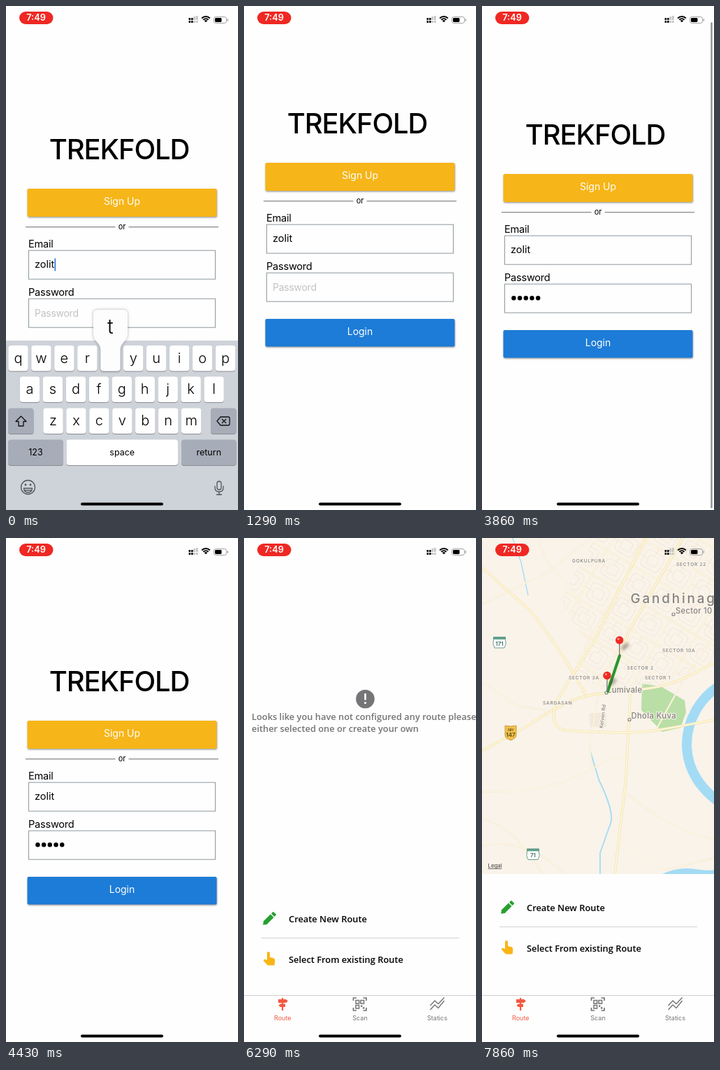
These frames come from a looping animation (332x720 px, 8000 ms). An HTML page with a canvas:

```html
<!DOCTYPE html>
<html lang="en">
<head>
<meta charset="utf-8">
<title>Sign in and route</title>
<style>
html, body { margin: 0; width: 100%; height: 100%; overflow: hidden; background: #fff; }
canvas { display: block; width: 332px; height: 720px; }
</style>
</head>
<body>
<canvas id="stage"></canvas>
<script>
const W = 332, H = 720, LOOP = 8000;
const cv = document.getElementById('stage');
const dpr = window.devicePixelRatio || 1;
cv.width = W * dpr;
cv.height = H * dpr;
const c = cv.getContext('2d');
const UI = 'Inter, "Liberation Sans", sans-serif';
const OPEN = '"Open Sans", "Noto Sans", sans-serif';

function text(s, x, y, size, o = {}) {
  c.font = `${o.w || 400} ${size}px ${o.f || UI}`;
  c.fillStyle = o.col || '#000';
  c.textAlign = o.al || 'left';
  c.letterSpacing = (o.ls || 0) + 'px';
  c.textBaseline = 'alphabetic';
  c.fillText(s, x, y);
  c.letterSpacing = '0px';
}
const mid = (s, x, y, size, o = {}) => text(s, x, y, size, { al: 'center', ...o });

function box(x, y, w, h, col, r = 0) {
  c.fillStyle = col;
  c.beginPath();
  c.roundRect(x, y, w, h, r);
  c.fill();
}
function disc(x, y, r, col) {
  c.fillStyle = col;
  c.beginPath();
  c.arc(x, y, r, 0, 7);
  c.fill();
}
function stroke(d, col, w) {
  c.strokeStyle = col;
  c.lineWidth = w;
  c.stroke(new Path2D(d));
}
function fill(d, col) {
  c.fillStyle = col;
  c.fill(new Path2D(d));
}
function at(x, y, turn, draw) {
  c.save();
  c.translate(x, y);
  c.rotate(turn);
  draw();
  c.restore();
}
function ease(k, a, b) {
  const u = Math.min(1, Math.max(0, (k - a) / (b - a)));
  return u * u * (3 - 2 * u);
}

function statusBar() {
  box(19, 8, 48.5, 18, '#ef2823', 9);
  mid('7:49', 43, 21.4, 12.8, { w: 600, col: '#fff' });
  for (let i = 0; i < 4; i++) {
    const col = i < 2 ? '#111' : '#c4c4c6';
    const tall = i < 2 ? 3 : 3 + i;
    box(261.5 + i * 3.5, 21, 2.7, 3, col, .5);
    box(261.5 + i * 3.5, 20 - tall, 2.7, tall, col, .5);
  }
  for (const [r, w] of [[8.2, 2.1], [5, 2.1], [1.6, 3]]) {
    c.strokeStyle = '#000';
    c.lineWidth = w;
    c.beginPath();
    c.arc(286, 23.2, r, -2.36, -.78);
    c.stroke();
  }
  c.strokeStyle = '#a0a0a2';
  c.lineWidth = 1;
  c.beginPath();
  c.roundRect(297.5, 15.5, 18, 9, 2.8);
  c.stroke();
  box(299, 17, 9.5, 6, '#000', 1.4);
  box(316.6, 18.3, 1.4, 3.4, '#a0a0a2', .7);
}

function button(y, h, col, label) {
  c.save();
  c.shadowColor = 'rgba(0,0,0,.42)';
  c.shadowBlur = 2.5 * dpr;
  c.shadowOffsetY = 1.2 * dpr;
  c.shadowOffsetX = .5 * dpr;
  box(30.5, y, 271, h, col, 2);
  c.restore();
  mid(label, 166, y + 22.6, 14, { col: '#fff', ls: -.05 });
}
function field(label, y) {
  text(label, 32, y, 14.6, { ls: -.25 });
  c.strokeStyle = '#8d989e';
  c.lineWidth = 1;
  c.strokeRect(32.5, y + 4.5, 267, 41);
}

function login(k) {
  const scroll = -37 * ease(k, 4, 7) - 25 * ease(k, 14, 17) + 62 * ease(k, 25, 28.3);
  c.save();
  c.translate(0, Math.round(scroll));
  mid('TREKFOLD', 162, 218.8, 40, { w: 500, ls: -1.1 });
  button(261, 40, '#f6b518', 'Sign Up');
  box(28, 315.3, 128.5, 1, '#686868');
  box(175.5, 315.3, 128.5, 1, '#686868');
  mid('or', 166, 318.7, 11);
  field('Email', 344.7);
  text('zolit', 41, 374.2, 14.5);
  if (k < 4) box(69.5, 360.5, 1.6, 18, '#2f6fe0');
  field('Password', 413.7);
  if (k < 15) text('Password', 41, 443.5, 13.9, { col: '#c2c2c5', ls: -.2 });
  if (k >= 26) for (let i = 0; i < 5; i++) disc(45.4 + i * 8.7, 438.3, 3.2, '#000');
  button(484, 39.5, '#1d7cd7', 'Login');
  c.restore();

  if (k >= 14 && k < 31) {
    const open = k > 25;
    const top = open ? 2 - scroll : -scroll * .52;
    c.globalAlpha = k === 14 || k === 30 ? .5 : 1;
    box(327.3, top, 2.4, open ? 717.5 - top : 355, '#8f8f91', 1.2);
    c.globalAlpha = 1;
  }
}

function key(x, y, w, label, size, col = '#fff') {
  box(x, y + 1, w, 36.5, '#898c92', 4);
  box(x, y, w, 36.5, col, 4);
  if (label) mid(label, x + w / 2, y + 18 + size * .34, size, { w: size > 15 ? 300 : 400 });
}
function keyboard(k) {
  const dy = 245 * ease(k, 3, 6);
  if (dy >= 245) return;
  const dark = '#a6adb8';
  c.save();
  c.translate(0, dy);
  box(0, 478, W, 260, '#ced2d9');
  [['qwertyuiop', 17.5, 485], ['asdfghjkl', 34, 529.5], ['zxcvbnm', 67.5, 574.5]].forEach(([row, x, y]) =>
    [...row].forEach((ch, i) => key(x + i * 32.95 - 14.2, y, 28.4, ch === 't' && k < 1 ? '' : ch, 20)));
  key(3, 574.5, 36.5, '', 20, dark);
  key(293, 574.5, 36.5, '', 20, dark);
  key(3, 619.5, 79, '123', 12.5, dark);
  key(86.5, 619.5, 159.5, 'space', 12.5);
  key(251, 619.5, 78.5, 'return', 12.5, dark);
  c.lineJoin = 'round';
  stroke('M21.5 586L29 593.5H25V600H18V593.5H14Z', '#111', 1.3);
  stroke('M302 593L307 587H318Q320 587 320 589V597Q320 599 318 599H307ZM309 590L315 596M315 590L309 596', '#111', 1.3);
  const ink = '#50555c';
  c.lineCap = 'round';
  stroke('M41.5 687.5A10 10 0 1 1 21.5 687.5A10 10 0 1 1 41.5 687.5M25.5 689H37.5Q37 695 31.5 695Q26 695 25.5 689ZM26 692H37', ink, 1.3);
  disc(28, 684, 1.4, ink);
  disc(35, 684, 1.4, ink);
  stroke('M302 682Q302 679 305 679Q308 679 308 682V688Q308 691 305 691Q302 691 302 688ZM299 686V688Q299 694 305 694Q311 694 311 688V686M305 694V698M301.5 698H308.5', ink, 1.3);
  c.lineCap = 'butt';
  if (k < 1) {
    c.save();
    c.shadowColor = 'rgba(0,0,0,.3)';
    c.shadowBlur = 4 * dpr;
    fill('M131 434H168Q174 434 174 440V468C174 480 163.5 480 163.5 492V517Q163.5 521.5 159 521.5H140Q135.5 521.5 135.5 517V492C135.5 480 125 480 125 468V440Q125 434 131 434Z', '#fdfdfd');
    c.restore();
    mid('t', 149.3, 467.5, 29, { w: 300 });
  }
  c.restore();
}

// Map
const ARTERIES = [
  'M0 304L45 280C75 264 100 243 135 230S225 221 262 210S310 188 340 174',
  'M212 222L206 345L190 480',
  'M104 240Q98 274 122 275Q210 280 240 276T340 258',
  'M104 240C120 205 145 178 166 136L236 -5',
  'M0 42L70 105Q90 130 118 172L150 226',
  'M178 222L212 130L290 -5'
];
const LANES = [
  'M0 362C60 366 120 352 156 331S190 312 209 318',
  'M-2 96L38 76L96 48L160 -4',
  'M0 205L50 240L92 246',
  'M0 440Q60 425 120 480',
  'M80 0Q92 40 115 60T160 145',
  'M207 365C250 400 290 425 340 432',
  'M248 276Q262 250 290 200L340 130',
  'M0 400Q45 415 66 452L88 480',
  'M198 430Q240 470 262 474L340 455',
  'M160 330Q150 300 158 275L166 225'
];

function road(d, w, casing, core) {
  stroke(d, casing, w);
  stroke(d, core, w - 1.2);
}
function cityGrid() {
  c.save();
  c.clip(new Path2D('M112 88L165 -5H340V172L262 206L180 220L128 196L148 150Z'));
  at(212, 130, .53, () => {
    for (let i = -5; i < 6; i++) for (let j = -5; j < 5; j++) {
      const x = i * 43, y = j * 40;
      c.strokeStyle = '#f4e8d5';
      c.lineWidth = 1;
      c.beginPath();
      c.roundRect(x + 7, y + 7, 29, 26, 6);
      c.roundRect(x + 14, y + 13, 15, 14, 3);
      c.moveTo(x + 21, y);
      c.lineTo(x + 21, y + 13);
      c.moveTo(x, y + 20);
      c.lineTo(x + 14, y + 20);
      c.stroke();
    }
    for (let i = -5; i < 6; i++) {
      road(`M${i * 43} -220V220`, 2.6, '#f3e4c2', '#fff9ea');
      road(`M-260 ${i * 40}H260`, 2.6, '#f3e4c2', '#fff9ea');
    }
  });
  c.restore();
}
function place(s, x, y, size, ls = 0) {
  c.lineJoin = 'round';
  c.font = `500 ${size}px ${UI}`;
  c.letterSpacing = ls + 'px';
  c.textAlign = 'left';
  c.strokeStyle = 'rgba(250,244,235,.9)';
  c.lineWidth = 2.5;
  c.strokeText(s, x, y);
  text(s, x, y, size, { w: 500, col: '#85827f', ls });
}
function shield(x, y, num, gold) {
  const d = gold
    ? 'M-8 -10Q0 -8 8 -10V4Q8 8 0 11Q-8 8 -8 4Z'
    : 'M-8.5 -8H8.500V-4Q10.500 2 7 7.500H-7Q-10.500 2 -8.500 -4Z';
  at(x, y, 0, () => {
    fill(d, gold ? '#f0c04a' : '#fff');
    if (!gold) box(-8.5, -8, 17, 3.4, '#5b9f8b');
    stroke(d, gold ? '#c9a040' : '#6e9c8e', 1);
    if (gold) mid('NH', 0, -2.5, 5, { w: 600, col: '#5d4a1c' });
    mid(num, 0, gold ? 5.5 : 4.3, 8, { w: 600, col: gold ? '#5d4a1c' : '#3f6e60' });
  });
}
function pin(x, y) {
  c.save();
  c.filter = 'blur(2px)';
  at(x + 8, y + 9, -.7, () => box(-6, -3, 12, 6, 'rgba(70,60,50,.45)', 3));
  c.restore();
  stroke(`M${x} ${y}V${y + 23}`, '#77797c', 1.3);
  disc(x, y, 5.7, '#ee2b25');
  disc(x - 1.6, y - 1.8, 1.5, '#ff9d93');
}
function map(loaded) {
  c.save();
  c.beginPath();
  c.rect(0, 0, W, 480);
  c.clip();
  box(0, 0, W, 480, '#f9f3ea');
  if (loaded) {
    fill('M229 208L256 212L290 232L292 249L284 271L258 277L228 246Z', '#b9dfa6');
    fill('M154 250H178V270H154Z', '#f3eadb');
    const water = '#a3dbf5';
    stroke('M344 209C312 226 292 262 293 298C295 336 316 361 344 381', water, 14);
    fill('M258 480Q282 469 305 473T340 472V480Z', water);
    stroke('M42 -5L56 35L66 82', water, 1.3);
    stroke('M154 301L167 345Q190 392 184 408T169 450V484', water, 1.8);
    cityGrid();
    LANES.forEach(d => road(d, 2.3, '#f4e6c8', '#fffaf0'));
    ARTERIES.forEach(d => road(d, 3.6, '#f3e0a8', '#fdf5d8'));

    [['GOKULPURA', 129, 34.5], ['SECTOR 22', 278, 39.5], ['SECTOR 10A', 258, 162.5],
     ['SECTOR 2', 207.5, 187.5], ['SECTOR 1', 233, 202], ['SECTOR 3A', 124, 201.5],
     ['SARGASAN', 87, 237.5]].forEach(([s, x, y]) => place(s, x, y, 6.6, .75));
    place('Gandhinagar', 212.5, 92.5, 18.8, 2.9);
    place('Sector 10', 277, 108, 11.2, .3);
    place('Lumivale', 179, 221, 11.2, .3);
    place('Dhola Kuva', 213.5, 257.5, 11.2, .4);
    at(173, 272, -1.45, () => place('Kelven Rd', 0, 0, 7, .1));
    for (const [x, y] of [[274, 109], [178, 221], [211, 259.5]]) {
      disc(x, y, 2.6, '#85827f');
      disc(x, y, 1.4, '#fff');
    }
    shield(25, 149.5, '171');
    shield(73, 452, '71');
    shield(41, 278, '147', true);
    c.lineCap = 'round';
    stroke('M197 168L180 219', '#28962f', 4);
    c.lineCap = 'butt';
    pin(196.7, 146);
    pin(179, 196.5);
  }
  text('Legal', 8.5, 471, 7.8, { w: 500, col: '#55524f' });
  box(8.5, 472, 20, .8, '#55524f');
  c.restore();
}

function tabs() {
  const red = '#f25a43', gray = '#757578';
  box(0, 653, W, 1, '#cfcfd2');
  box(54, 657, 2.2, 18, red);
  fill('M49 659H60L63 661.5L60 664H49ZM59 665.5H52L49.5 667.7L52 670H59Z', red);
  stroke('M156.5 661V657H161M170.5 657H175V661M175 671V675H170.5M161 675H156.5V671', gray, 1.7);
  for (const [x, y] of [[160, 660.5], [167, 660.5], [160, 667.5]]) {
    c.strokeStyle = gray;
    c.lineWidth = 1.5;
    c.strokeRect(x, y, 4.6, 4.6);
  }
  box(167, 667.5, 2.4, 2.4, gray);
  box(170, 670.2, 2.4, 2.4, gray);
  stroke('M266.5 674L273 667L278 671.5L286.500 661M266.5 668L273 661L278 665.500L286.500 656.500', gray, 1.4);
  mid('Route', 55.3, 689, 9.1, { col: red });
  mid('Scan', 166, 689, 9.1, { col: gray });
  mid('Statics', 276.5, 689, 9.1, { col: gray });
}
function home(k) {
  const mapped = k >= 53;
  if (mapped) map(k >= 54);
  else {
    const o = { f: OPEN, w: 600, col: '#757575' };
    disc(173.5, 230, 13.3, '#757578');
    box(172.2, 222, 2.7, 9.5, '#fff', .8);
    disc(173.5, 235.5, 1.6, '#fff');
    text('Looks like you have not configured any route please', 11, 260.3, 12.85, o);
    text('either selected one or create your own', 11, 277.3, 12.85, o);
  }
  c.save();
  c.translate(0, mapped ? -16 : 0);
  at(36, 544, -Math.PI / 4, () => {
    fill('M-12.5 0L-8 -3.3H6V3.3H-8Z', '#27a030');
    box(7.3, -3.3, 4.2, 6.6, '#27a030', 1.2);
  });
  fill('M33 593Q33 591 35 591Q37 591 37 593V599L42 600Q44.5 601 44.3 604L43.5 610.5H34L28 604Q27.5 602 29.5 601.7L33 603Z', '#fab414');
  const row = { f: OPEN, w: 600 };
  text('Create New Route', 64, 548.6, 12.87, row);
  box(25, 571, 283, 1, '#d3d3d6');
  text('Select From existing Route', 64, 606.6, 12.87, row);
  c.restore();
  tabs();
}

function render(t) {
  // The picture advances seven times a second on a 10 ms clock.
  const k = Math.floor((Math.floor(t / 10) + .5) * .07);
  c.setTransform(dpr, 0, 0, dpr, 0, 0);
  box(0, 0, W, H, '#fefefe');
  if (k < 41) {
    login(k);
    keyboard(k);
  } else home(k);
  statusBar();
  box(107, 709.6, 118, 4, '#000', 2);
}

const start = performance.now();
function tick() {
  render((performance.now() - start) % LOOP);
  requestAnimationFrame(tick);
}
tick();
</script>
</body>
</html>
```
